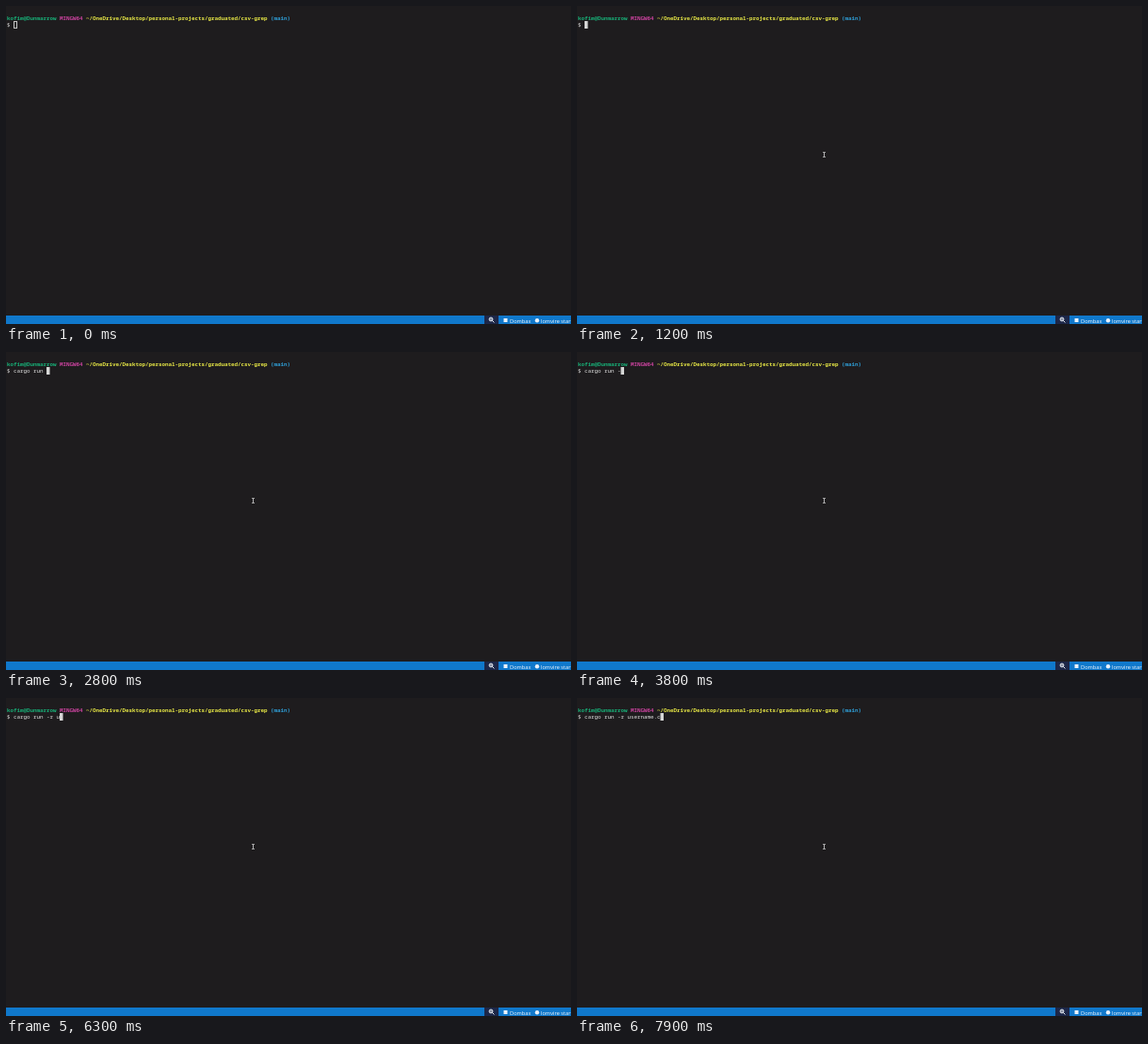
These frames come from a looping animation (600 px wide and 338 px high, 8000 ms). An HTML page with a canvas:

```html
<!DOCTYPE html>
<html lang="en">
<head>
<meta charset="utf-8">
<title>Terminal</title>
<style>
  html, body { margin: 0; height: 100%; overflow: hidden; background: #1e1c1e; }
  canvas { display: block; }
</style>
</head>
<body>
<canvas id="stage" width="600" height="338"></canvas>
<script>
const ctx = document.getElementById("stage").getContext("2d");
const LOOP = 8000, STEP = 100, CELL = 3.5, LEFT = 1;
const MONO = '5.9px "Noto Sans Mono", "DejaVu Sans Mono", monospace';
const SANS = '5.7px "Open Sans", "Noto Sans", sans-serif';

const prompt = [
  [0, "kofim@Dunmarrow", "#18ad76"],
  [16, "MINGW64", "#c8429c"],
  [24, "~/OneDrive/Desktop/personal-projects/graduated/csv-grep", "#e6e645"],
  [80, "(main)", "#2f9fd8"]
];

// [time, command line from then on]
const typed = [
  [0, ""], [1800, "c"], [1900, "ca"], [2000, "car"], [2200, "carg"],
  [2300, "cargo"], [2400, "cargo "], [2500, "cargo r"], [2600, "cargo ru"],
  [2700, "cargo run"], [2800, "cargo run "], [2900, "cargo run -r"],
  [3000, "cargo run "], [3800, "cargo run -"], [4000, "cargo run -r"],
  [4200, "cargo run -r "], [5000, "cargo run -r s"], [5200, "cargo run -r ser"],
  [5500, "cargo run -r s"], [5700, "cargo run -r "], [6300, "cargo run -r u"],
  [6400, "cargo run -r user"], [6600, "cargo run -r usern"],
  [6700, "cargo run -r usernam"], [6900, "cargo run -r username"],
  [7000, "cargo run -r username."], [7600, "cargo run -r usernam"],
  [7900, "cargo run -r username.c"]
];

// [time, x, y] of the mouse pointer
const path = [[100, 512, 322], [700, 256, 160], [1000, 262, 158]];

function rect(x, y, w, h, color) {
  ctx.fillStyle = color;
  ctx.fillRect(x, y, w, h);
}

function cells(col, text, y, color, weight) {
  ctx.font = weight + " " + MONO;
  ctx.fillStyle = color;
  [...text].forEach((ch, i) => ctx.fillText(ch, LEFT + (col + i) * CELL, y));
}

function label(text, x) {
  ctx.font = SANS;
  ctx.fillStyle = "#f2f7fc";
  ctx.fillText(text, x, 336.6);
}

function ring(x, y, r, width) {
  ctx.lineWidth = width;
  ctx.beginPath();
  ctx.arc(x, y, r, 0, 7);
  ctx.stroke();
}

function statusBar() {
  rect(0, 329, 600, 9, "#1078cb");
  rect(508, 329, 15, 9, "#1d2748");
  ctx.strokeStyle = "#f2f7fc";
  ring(515, 333, 1.9, 1);
  ctx.beginPath();
  ctx.moveTo(516.4, 334.4);
  ctx.lineTo(518.4, 336.4);
  ctx.moveTo(514, 333);
  ctx.lineTo(516, 333);
  ctx.stroke();
  rect(528.5, 332, 4, 4, "#e8f1fa");
  label("Dombax", 535);
  ctx.fillStyle = "#e8f1fa";
  ctx.beginPath();
  ctx.arc(564, 334.3, 2.2, 0, 7);
  ctx.fill();
  label("lomvire starting", 568);
}

function pointer(t) {
  if (t < path[0][0]) return;
  let [, x, y] = path[path.length - 1];
  const i = path.findIndex(p => p[0] > t);
  if (i > 0) {
    const [t0, x0, y0] = path[i - 1], [t1, x1, y1] = path[i];
    const k = 1 - (1 - (t - t0) / (t1 - t0)) ** 2;
    x = Math.round(x0 + (x1 - x0) * k);
    y = Math.round(y0 + (y1 - y0) * k);
  }
  rect(x, y - 3, 1, 6, "#b4b3b4");
  rect(x - 1, y - 3, 3, 1, "#a3a2a3");
  rect(x - 1, y + 2, 3, 1, "#a3a2a3");
}

function commandLine(t) {
  const text = typed.filter(s => s[0] <= t).pop()[1];
  const x = LEFT + (text.length + 2) * CELL;
  cells(0, "$ " + text, 22.2, "#e2e2e2", 500);
  if (t >= 1200) {
    rect(x, 16, CELL, 8, "#d6d6d6");
  } else {
    ctx.strokeStyle = "#c4c4c4";
    ctx.lineWidth = 1;
    ctx.strokeRect(8.5, 16.5, 3, 7);
  }
}

function draw(now) {
  const t = Math.floor(now % LOOP / STEP) * STEP;
  rect(0, 0, 600, 338, "#1e1c1e");
  for (const [col, text, color] of prompt) cells(col, text, 14.6, color, 600);
  commandLine(t);
  statusBar();
  pointer(t);
}

let start;
function frame(now) {
  start ??= now;
  draw(now - start);
  requestAnimationFrame(frame);
}
draw(0);
requestAnimationFrame(frame);
</script>
</body>
</html>
```
